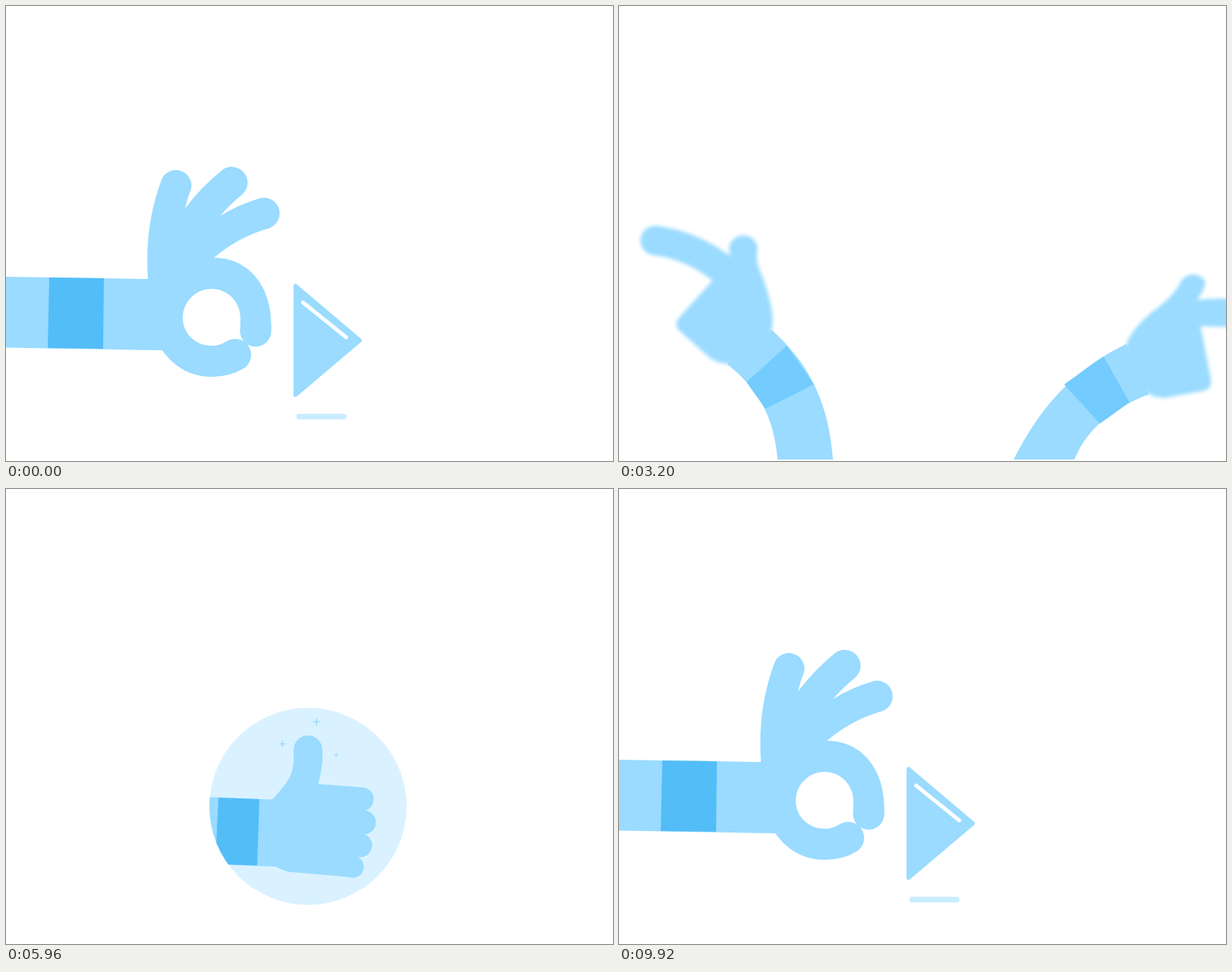
Animation, 800 px wide and 600 px high, one loop 9960 ms. Source, as an HTML page without scripts:

```html
<!DOCTYPE html>
<html lang="en">
<head>
<meta charset="utf-8">
<title>Throw, loop, land</title>
<style>
html, body { margin: 0; width: 100%; height: 100%; overflow: hidden; background: #fff; }
svg { display: block; width: 800px; height: 598px; overflow: hidden; fill: #9adbff; }

.grip, .grip path, .arm, .arm path, .kite, .wing, .line, .bubble, .thumb, .spark, .glint {
  animation: 9.96s linear infinite;
}

/* throwing hand: --a shut, --b open */
.grip { transform-origin: -100px 430px; animation-name: reach; }
.grip path { d: var(--a); animation-name: open; }
.hand {
  --a: path("M187,359C184,310 190,270 205,229A20.5,20.5 0 0 1 244,241Q239,253 236,267Q257,239 284,217A20.5,20.5 0 0 1 311,249Q296,261 282,277Q306,262 333,254A20.5,20.5 0 0 1 347,293Q307,304 274,332C320,332 353,370 349.5,431A20.5,20.5 0 0 1 308.5,426Q309,420 309,412C309,390 292,373 271,373C250,373 233,390 233,411C233,432 250,448 271,448Q282,448 291,442A20.5,20.5 0 0 1 313,478Q295,489 271,489C245,489 222,477 206,454L170,430L170,380Z");
  --b: path("M293,352C286,320 268,285 250,257A20.5,20.5 0 0 1 284,234Q288,238 292,245Q290,232 288,222A20.5,20.5 0 0 1 328,213Q334,240 336,266Q347,237 350,202A20.5,20.5 0 0 1 391,206Q388,236 380,264C395,248 411,228 425,204A20.5,20.5 0 0 1 461,226Q434,266 400,304C380,326 368,338 360,348C354,355 351,362 351,371C351,392 368,409 389,409Q408,409 420,394A20.5,20.5 0 0 1 453,418Q430,450 390,450C370,450 356,444 345,437L310,420L290,375Z");
}
.forearm {
  --a: path("M-60,356Q60,358 187,360L230,400L206,454Q60,451.5 -60,449.5Z");
  --b: path("M-60,414Q140,385 293,352L340,400L345,437Q150,478 -60,509Z");
}
.stripe {
  fill: #53bdf8;
  --a: path("M57,358L129,359L128,452L55,451Z");
  --b: path("M190,374L252,361L270,452L207,465Z");
}
@keyframes open {
  0%, .4% { d: var(--a); animation-timing-function: ease-in-out; }
  4.4%, 67.86% { d: var(--b); }
  67.87%, 70.28% { d: var(--a); animation-timing-function: ease-in-out; }
  79.92%, 84.34% { d: var(--b); animation-timing-function: ease-in-out; }
  93.57%, 100% { d: var(--a); }
}
@keyframes reach {
  0%, .4%, 67.87%, 70.28%, 79.92%, 84.34%, 93.57%, 100% {
    transform: translate(0, 0) rotate(0); animation-timing-function: ease-in-out; }
  2.2%, 75%, 89% { transform: translate(0, 0) rotate(-6deg); animation-timing-function: ease-in-out; }
  4.4% { transform: translate(0, 0) rotate(0); animation-timing-function: ease-in; }
  8.6%, 67.86% { transform: translate(-580px, 40px) rotate(0); }
}

/* guiding arms: --a out, --b turning, --c raised */
.arm { transform-origin: 240px 598px; animation-name: raise; }
.arm path { d: var(--a); animation-name: swing; }
.arm .palm { animation-name: swing, blur; }
.late, .late path { animation-delay: -9.88s; }
.palm {
  --a: path("M130,446C121,423 100,407 87,397C70,384 64,375 59,366A19,19 0 0 0 25,364Q28,378 37,388Q0,383 -55,392A19,19 0 0 0 -52,430Q-10,422 32,423L19,490Q16,506 28,508L79,517Q92,517 100,512L125,490Z");
  --b: path("M201,427C206,405 196,380 190,360C182,343 180,335 182,318A19,19 0 0 0 145,316Q144,325 147,330Q100,296 48,290A19,19 0 0 0 46,329Q85,333 123,362L80,410Q71,420 79,428L118,463Q128,471 142,472L185,465Z");
  --c: path("M230,445C248,434 260,405 270,388C277,375 285,367 294,361A19,19 0 0 0 274,328Q254,340 241,363Q230,310 209,249A19,19 0 0 0 172,261Q187,305 197,346L131,367Q119,371 122,383L136,427Q142,447 158,451L200,480Z");
}
.sleeve {
  --a: path("M130,446C180,470 235,510 279,598L292,640L212,640L199,598C180,552 140,527 100,512Z");
  --b: path("M201,427C240,462 276,510 282,598L284,640L212,640L209,598C205,545 185,505 142,472Z");
  --c: path("M230,445C240,495 258,545 278,598L293,640L216,640L201,598C184,550 170,505 157,449Z");
}
.cuff {
  fill: #73ccfd;
  --a: path("M126,523L160,462L212,499L165,551Z");
  --b: path("M168,496L221,448L257,499L193,531Z");
  --c: path("M166,485L236,466L248,513L180,533Z");
}
@keyframes swing {
  0%, 31.33% { d: var(--a); }
  32.13% { d: var(--b); animation-timing-function: ease-out; }
  35.3%, 50.4% { d: var(--c); animation-timing-function: ease-in; }
  52.6% { d: var(--b); }
  54%, 100% { d: var(--a); }
}
@keyframes raise {
  0%, 30.3% { transform: translate(-180px, 340px) rotate(0); animation-timing-function: ease-out; }
  31.33%, 40%, 47.2%, 52.8% { transform: translate(0, 0) rotate(0); animation-timing-function: ease-in-out; }
  43.6% { transform: translate(0, 0) rotate(-.9deg); animation-timing-function: ease-in-out; }
  56%, 100% { transform: translate(-180px, 340px) rotate(0); }
}
@keyframes blur {
  0%, 30.3% { filter: blur(0); }
  31%, 32.3% { filter: blur(2.5px); }
  33.6%, 100% { filter: blur(0); }
}

/* kite turns round a travelling centre, 70px below it at rest */
.kite { animation-name: fly; }
.wing {
  stroke: #9adbff; stroke-width: 5; stroke-linejoin: round;
  --flat: path("M-28.5,-72Q-28.5,0 -28.5,72L56.5,0Z");
  --bent: path("M-32.5,-66Q-18,0 -32.5,66L56.5,0Z");
  d: var(--flat); animation-name: bend;
}
.shine { stroke: #fff; stroke-width: 5; stroke-linecap: round; }
@keyframes bend {
  0%, 10.43%, 67.87%, 100% { d: var(--flat); }
  10.44%, 67.86% { d: var(--bent); }
}
@keyframes fly {
  0%, .8% { transform: translate(410px, 371px) rotate(0) translate(0, 70px) scale(1); animation-timing-function: ease-in; }
  5.6%, 10.43% { transform: translate(920px, 350px) rotate(-8deg) translate(0, 70px) scale(1); }
  10.44% { transform: translate(-110px, 262px) rotate(8deg) translate(0, 70px) scale(1.1); }
  13.65% { transform: translate(270px, 266px) rotate(-15deg) translate(0, 70px) scale(1.2); }
  15.26% { transform: translate(335px, 269px) rotate(-90deg) translate(0, 70px) scale(1.25); }
  16.867% { transform: translate(393px, 268.6px) rotate(-188deg) translate(0, 70px) scale(1.25); }
  20.08% { transform: translate(398px, 275px) rotate(-265deg) translate(0, 70px) scale(1.2); }
  21.7% { transform: translate(410px, 280px) rotate(-325deg) translate(0, 70px) scale(1.2); }
  22.9% { transform: translate(450px, 280px) rotate(-362deg) translate(0, 70px) scale(1.15); }
  26.1%, 30% { transform: translate(940px, 270px) rotate(-375deg) translate(0, 70px) scale(1); }
  34.5% { transform: translate(960px, 194px) rotate(-175deg) translate(0, 70px) scale(.91); animation-timing-function: ease-out; }
  40.16% { transform: translate(460px, 192px) rotate(-195deg) translate(0, 70px) scale(.91); }
  48.19% { transform: translate(432px, 199px) rotate(-278.9deg) translate(0, 70px) scale(.91); animation-timing-function: ease-in; }
  51% { transform: translate(469px, 412px) rotate(-275deg) translate(0, 70px) scale(.1); }
  51.2%, 67.86% { transform: translate(469px, 412px) rotate(-275deg) translate(0, 70px) scale(0); }
  67.87%, 70.28%, 93.57%, 100% { transform: translate(410px, 371px) rotate(0) translate(0, 70px) scale(1); animation-timing-function: ease-in-out; }
  79.92%, 84.34% { transform: translate(582.5px, 370px) rotate(0) translate(0, 70px) scale(1); animation-timing-function: ease-in-out; }
}
.line { stroke: #c9ecff; stroke-width: 7.5; stroke-linecap: round; animation-name: slide; }
@keyframes slide {
  0%, .8% { transform: none; opacity: 1; animation-timing-function: ease-in; }
  5.6%, 67.86% { transform: translateX(480px); opacity: 0; }
  67.87%, 70.28%, 93.57%, 100% { transform: none; opacity: 1; animation-timing-function: ease-in-out; }
  79.92%, 84.34% { transform: translateX(170px); opacity: 1; animation-timing-function: ease-in-out; }
}

/* badge */
.bubble { transform-origin: 398px 418.5px; animation-name: grow; }
.thumb { animation-name: enter; }
@keyframes grow {
  0%, 47.6% { transform: scale(0); }
  48.19% { transform: scale(.015); }
  50.6% { transform: scale(.04); animation-timing-function: ease-out; }
  54% { transform: scale(1.06); animation-timing-function: ease-in-out; }
  55.5% { transform: scale(.98); }
  57%, 67.86% { transform: none; }
  67.87%, 100% { transform: scale(0); }
}
@keyframes enter {
  0%, 54% { transform: translate(-270px, 15px); animation-timing-function: ease-out; }
  57.6% { transform: translate(6px, 0); animation-timing-function: ease-in-out; }
  58.8%, 100% { transform: translate(0, 0); }
}

.spark { animation-name: spark; }
.glint { animation-name: glint; }
@keyframes spark {
  0%, 7% { transform: scale(0); animation-timing-function: ease-out; }
  9.7%, 20.1% { transform: scale(1); }
  21.6% { transform: scale(1.4); }
  24%, 100% { transform: scale(0); }
}
@keyframes glint {
  0%, 57.4% { transform: scale(0); animation-timing-function: ease-out; }
  59.7%, 100% { transform: scale(1); }
}
</style>
</head>
<body>
<svg viewBox="0 0 800 598">
  <defs>
    <path id="plus" d="M-7.6 0H7.6M0-7.6V7.6" stroke="#93d6fc" stroke-width="2.5" stroke-linecap="round"/>
    <clipPath id="disc"><circle cx="398" cy="418.5" r="130"/></clipPath>
  </defs>

  <g class="grip">
    <path class="forearm"/>
    <path class="hand"/>
    <path class="stripe"/>
  </g>

  <g class="arm">
    <path class="palm"/>
    <path class="sleeve"/>
    <path class="cuff"/>
  </g>
  <g transform="translate(799 0) scale(-1 1)">
    <g class="arm late">
      <path class="palm"/>
      <path class="sleeve"/>
      <path class="cuff"/>
    </g>
  </g>

  <g class="bubble">
    <circle cx="398" cy="418.5" r="130" fill="#daf2ff"/>
    <g clip-path="url(#disc)">
      <g class="thumb">
        <path d="M200,403.500L351,409.500C370,388 379,378 379,357V344A19,19 0 0 1 417,344C418,365 414,378 411.500,389L470,393.500A15.500,15.500 0 0 1 473,424A15.500,15.500 0 0 1 471,455A15.500,15.500 0 0 1 463,485A14,14 0 0 1 451,511.500L375,505Q363,503 356,498L200,492Z"/>
        <path fill="#53bdf8" d="M280,407L334,409L331,496.500L276,494.500Z"/>
      </g>
    </g>
    <g transform="translate(409.300 307) scale(.57)"><use href="#plus" class="glint"/></g>
    <g transform="translate(364 336) scale(.5)"><use href="#plus" class="glint"/></g>
    <g transform="translate(435 351) scale(.33)"><use href="#plus" class="glint"/></g>
  </g>

  <g transform="translate(262.500 130.500)"><use href="#plus" class="spark"/></g>
  <g transform="translate(547 189.500) scale(.77)"><use href="#plus" class="spark"/></g>
  <g transform="translate(311.500 397) scale(.5)"><use href="#plus" class="spark"/></g>

  <path class="line" d="M386.500 541.500H445"/>
  <g class="kite">
    <path class="wing"/>
    <path class="shine" d="M-18.500-50L38.500-4"/>
  </g>
</svg>
</body>
</html>
```
